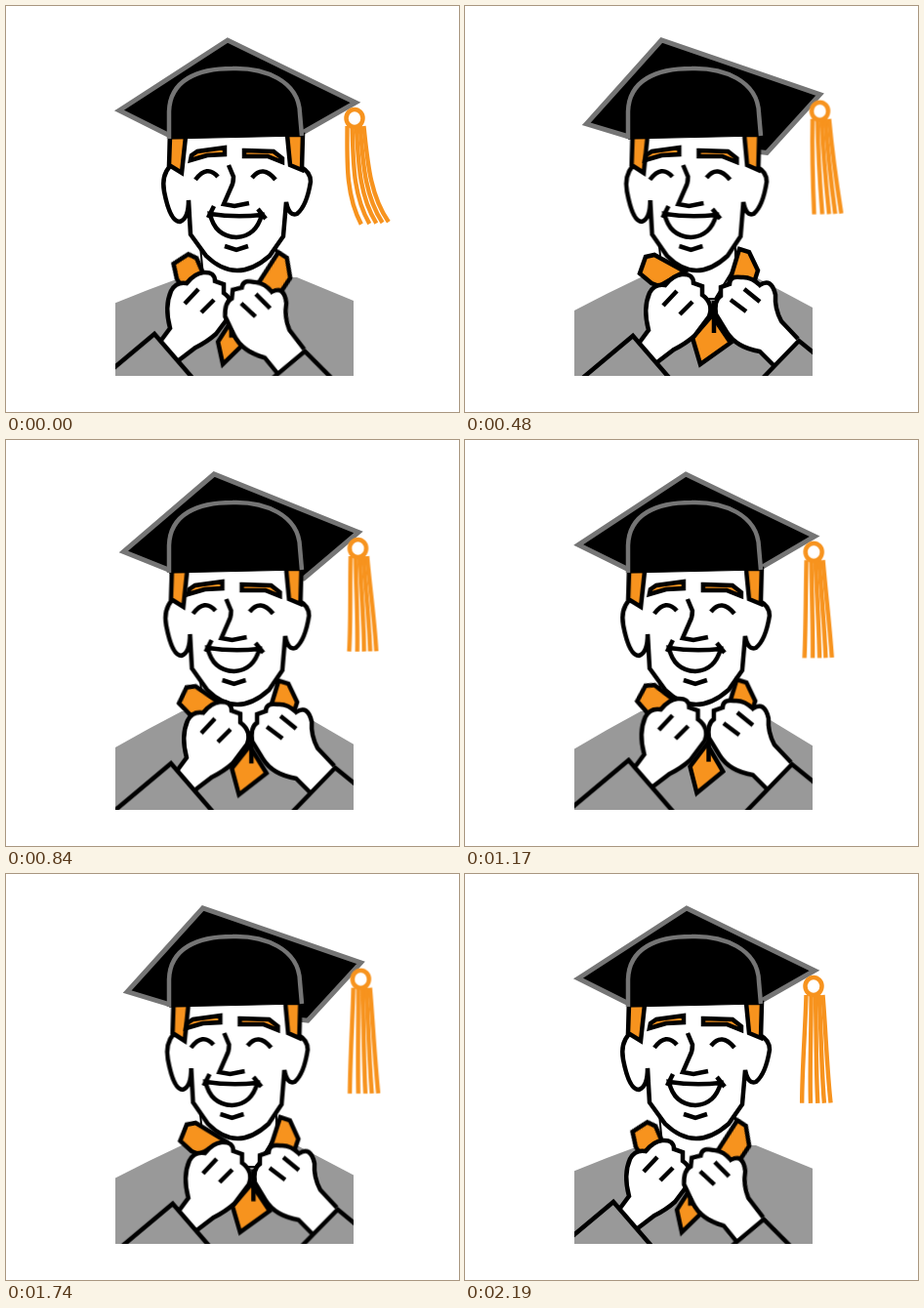
These frames come from a looping animation (464 by 416 pixels, 2220 ms). An HTML page without scripts:

```html
<!DOCTYPE html>
<html lang="en">
<head>
<meta charset="utf-8">
<title>Happy graduate</title>
<style>
html, body { margin: 0; width: 100%; height: 100%; overflow: hidden; background: #fff; }
svg { display: block; width: 464px; height: 416px; }
.ink { stroke: #000; stroke-width: 4.5; }
.ink path { vector-effect: non-scaling-stroke; }
.skin { fill: #fff; }
.hair { fill: #f7931e; }
.cloth { fill: #999; }
.line { fill: none; }

/* arms and clothes move evenly: start, middle, end, and back again */
.body { animation: sway 2.22s linear infinite; }
@keyframes sway {
  0%, 98.65%, 100% { transform: translate(var(--start)) rotate(var(--tilt, 0deg)) scale(var(--grow, 1)); }
  21.62%, 77.03% { transform: translate(0, 0) rotate(0deg) scale(1); }
  48.65%, 50% { transform: translate(var(--end)) rotate(var(--lean, 0deg)) scale(var(--shrink, 1)); }
}
.gown { --start: 0, 0; --end: 0, 0; --grow: 1, .77; --shrink: 1, 1.15; transform-origin: 0 278px; }
.tie { --start: -19px, 0px; --end: -4px, -6px; --grow: .62, .85; --shrink: .85, 1; transform-origin: 241px 367px; }
.arm-l { --start: -20px, -2px; --end: -5px, -11px; }
.arm-r { --start: -31px, 2px; --tilt: 6deg; --end: -8px, -12px; transform-origin: 256px 300px; }
.flap-l { --start: -5px, -5px; --tilt: 38deg; --end: -2px, -6px; --lean: 10deg; transform-origin: 185px 268px; }
.flap-r { --start: -4px, 5px; --tilt: 16deg; --end: -3px, -4px; transform-origin: 288px 255px; }

/* head and cap ease out to one side and back */
.turn { animation: 2.22s ease-in-out infinite; }
.head { animation-name: head; transform-origin: 246px 0; }
.look { animation-name: look; }
.board { animation-name: board; }
.tassel { animation-name: tassel; }
.strand { animation-name: swing; }
@keyframes head {
  0%, 48.65%, 50%, 98.65%, 100% { transform: scaleX(1); }
  27.03%, 72.97% { transform: scaleX(.95); }
}
@keyframes look {
  0%, 48.65%, 50%, 98.65%, 100% { transform: translateX(0); }
  27.03%, 72.97% { transform: translateX(-5px); }
}
@keyframes board {
  0%, 48.65%, 50%, 98.65%, 100% { d: path("M116 107L227 35L358 99L300 132L168 133Z"); }
  27.03%, 72.97% { d: path("M125 122L199 35L364 90L310 152L168 134Z"); }
}
@keyframes tassel {
  0%, 48.65%, 50%, 98.65%, 100% { transform: translate(357px, 115px); }
  27.03%, 72.97% { transform: translate(364px, 107px); }
}
@keyframes swing {
  0%, 98.65%, 100% { d: path("M0 8C2 45 2 80 22 108"); }
  9.46%, 89.19% { d: path("M0 8C1 40 4 70 4 105"); }
  21.62%, 77.03% { d: path("M0 9C1 45 0 85 2 120"); }
  37.84%, 60.81% { d: path("M0 9C4 55 -4 76 -20 95"); }
  48.65%, 50% { d: path("M0 8C3 40 6 88 37 95"); }
}
/* each strand fans out from its place under the ring */
.strands { fill: none; stroke: #f7931e; stroke-width: 4.4; }
.strands use { transform: translateX(calc(var(--i) * 4px + 1px)) rotate(calc(var(--i) * -1.6deg)); }
</style>
</head>
<body>
<svg viewBox="0 0 464 416" xmlns="http://www.w3.org/2000/svg">
  <defs>
    <clipPath id="crop"><path d="M112 0H356V379H112Z"/></clipPath>
    <path id="strand" class="turn strand"/>
  </defs>

  <g clip-path="url(#crop)">
    <path class="body gown cloth" d="M112 312Q146 294 180 278H298L356 309V520H112Z"/>
  </g>
  <path class="skin" stroke="#000" stroke-width="2" d="M199 246H277V266L256 300H224L202 277Z"/>
  <path class="turn board" stroke="#757575" stroke-width="5"/>

  <g class="turn head ink">
    <path class="skin" d="M168 133V164Q159 174 162 190Q168 221 178 221Q187 218 187 199L189 234L205 256Q236 286 270 256L284 236L287 201Q290 216 298 213Q308 205 312 180Q312 170 302 165V133"/>
    <path class="hair" d="M168 134H184L180 171L167 163ZM288 132H304L303 168L291 163Z"/>
  </g>
  <g class="turn look ink line">
    <path class="hair" d="M189 158L190 153L196 149L224 145V152L206 153ZM244 148L274 149L283 156V160L268 154H244Z"/>
    <path d="M194 178Q206 162 217 175M252 176Q263 162 276 178"/>
    <path d="M228 163L233 175Q233 182 230 187L223 203L234 205L249 202"/>
    <path d="M209 213Q235 217 262 214Q256 236 236 237Q214 236 209 213Z"/>
    <path d="M213 205L207 217M258 208L266 218M224 246L236 250L248 246"/>
  </g>

  <path stroke="#000" d="M167 136V108C168 76 196 64 232 64C264 63 300 76 301 110L303 133Z"/>
  <path class="line" stroke="#757575" stroke-width="4.5" d="M167 136V108C168 76 196 64 232 64C264 63 300 76 301 110L303 133"/>

  <g class="ink hair">
    <path class="body flap-l" d="M179 274L185 257L194 255L225 272L199 287L191 284Z"/>
    <path class="body flap-r" d="M281 249L291 252L300 271L292 296L268 292Z"/>
    <g class="body tie">
      <path d="M253 317L272 345L241 367L233 340Z"/>
      <path d="M255 302V335"/>
    </g>
  </g>

  <g class="ink" clip-path="url(#crop)">
    <g class="body arm-l">
      <path class="skin" d="M177 347L188 332Q182 310 189 294Q194 284 205 286Q213 276 222 275Q234 274 234 284L243 287V296Q255 305 250 318L235 338Q226 346 214 352L189 371"/>
      <path class="line" d="M203 307L217 292M220 316L233 303"/>
      <path class="cloth" d="M92 405L172 338L230 405"/>
    </g>
    <g class="body arm-r">
      <path class="skin" d="M341 341L324 323Q317 310 318 296Q314 278 302 286Q293 277 283 278Q271 276 271 285L262 288V297Q255 301 257 316L268 334Q278 350 302 354L318 370"/>
      <path class="line" d="M286 290L302 303M272 301L288 313"/>
      <path class="cloth" d="M282 405L342 343L412 400"/>
    </g>
  </g>

  <g class="turn tassel">
    <g class="strands">
      <use href="#strand" style="--i:-2"/>
      <use href="#strand" style="--i:-.8"/>
      <use href="#strand" style="--i:.2"/>
      <use href="#strand" style="--i:1.1"/>
      <use href="#strand" style="--i:2"/>
    </g>
    <ellipse rx="8.5" ry="9" fill="#fff" stroke="#f7931e" stroke-width="4.5"/>
  </g>
</svg>
</body>
</html>
```
